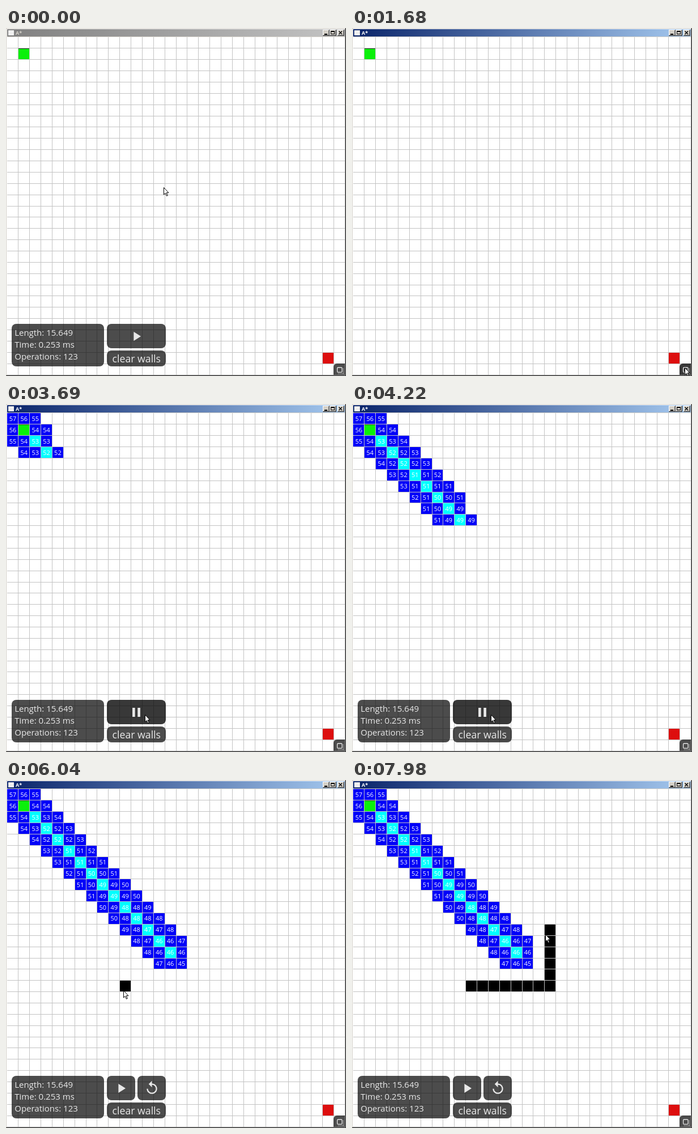
These frames come from a looping animation (600 by 614 pixels, 8000 ms). An HTML page with a canvas:

```html
<!DOCTYPE html>
<html lang="en">
<head>
<meta charset="utf-8">
<title>Path search</title>
<style>
  html, body { margin: 0; width: 100%; height: 100%; overflow: hidden; background: #fff; }
  canvas { display: block; }
</style>
</head>
<body>
<canvas id="stage" width="600" height="614"></canvas>
<script>
const ctx = document.getElementById('stage').getContext('2d');
const LOOP = 8000, PITCH = 596 / 30, LEFT = 2, TOP = 16;
const FONT = '"Open Sans", "Noto Sans", sans-serif';
const INK = '#e8e8e8';

// Screen refreshes: first time, last time, number of steps.
const REFRESH = [
  [0, 0, 1], [350, 1130, 11], [1210, 1290, 2], [1600, 1680, 2], [2530, 2530, 1],
  [2760, 3220, 7], [3450, 4220, 11], [4300, 4770, 7], [4930, 5720, 11],
  [5800, 6040, 4], [6270, 7040, 11], [7110, 7110, 1], [7270, 7980, 10]
];
const ticks = REFRESH.flatMap(([from, to, n]) =>
  Array.from({ length: n }, (_, i) => from + (n > 1 ? (to - from) * i / (n - 1) : 0)));

// Pointer track: time, x, y.
const TRACK = [
  [0, 278, 281], [300, 278, 281], [500, 318, 325], [800, 462, 478], [1000, 560, 578],
  [1130, 585, 598], [1290, 587, 599], [2700, 587, 599], [2840, 500, 596], [2990, 330, 588],
  [3070, 272, 580], [3220, 245, 548], [4850, 245, 548], [4930, 248, 516], [5010, 252, 468],
  [5300, 246, 424], [5720, 224, 380], [5960, 207, 371], [6200, 206, 371],
  [6880, 330, 370], [7040, 348, 369], [7110, 347, 369], [7200, 347, 369],
  [7500, 345, 327], [7800, 342, 281], [7900, 341, 273], [7980, 341, 272]
];

function pointer(t) {
  let i = TRACK.findIndex(p => p[0] > t);
  if (i < 0) return TRACK[TRACK.length - 1].slice(1);
  const [a, b] = [TRACK[i - 1], TRACK[i]];
  const f = (t - a[0]) / (b[0] - a[0]);
  return [1, 2].map(j => a[j] + (b[j] - a[j]) * f);
}

// Cells in the order the search visits them, expanding along the diagonal.
const AROUND = [[1, 0], [1, 1], [0, 1], [-1, 1], [-1, 0], [-1, -1], [0, -1], [1, -1]];
const visits = [];
const seen = new Set(['1,1']);
for (let k = 1; k <= 14; k++) {
  for (const [dx, dy] of AROUND) {
    const c = k + dx, r = k + dy, key = c + ',' + r;
    if (seen.has(key)) continue;
    seen.add(key);
    const cost = (k - 1) * Math.SQRT2 + Math.hypot(dx, dy);
    visits.push({ c, r, k, score: Math.floor(56 - c - r + cost) });
  }
}

const edgeX = c => Math.round(LEFT + c * PITCH);
const edgeY = r => Math.round(TOP + r * PITCH);

function rect(color, x, y, w, h) {
  ctx.fillStyle = color;
  ctx.fillRect(x, y, w, h);
}

function cell(color, c, r) {
  const x = edgeX(c), y = edgeY(r);
  rect(color, x, y, edgeX(c + 1) - x, edgeY(r + 1) - y);
}

function text(str, x, y, font, color, align = 'left') {
  ctx.font = font + ' ' + FONT;
  ctx.fillStyle = color;
  ctx.textAlign = align;
  ctx.fillText(str, x, y);
}

function panel(x, y, w, h, dark, radii = 8) {
  ctx.fillStyle = `rgba(0,0,0,${dark ? 0.78 : 0.7})`;
  ctx.beginPath();
  ctx.roundRect(x, y, w, h, radii);
  ctx.fill();
}

const ICONS = {
  play: new Path2D('M8 5v14l11-7z'),
  pause: new Path2D('M6 19h4V5H6zM14 5v14h4V5z'),
  replay: new Path2D('M12 5V1L7 6l5 5V7c3.3 0 6 2.7 6 6s-2.7 6-6 6-6-2.7-6-6H4c0 4.4 3.6 8 8 8s8-3.6 8-8-3.6-8-8-8z')
};

function icon(name, x, y) {
  ctx.save();
  ctx.translate(x, y);
  ctx.scale(1.15, 1.15);
  ctx.translate(-12, -12);
  ctx.fillStyle = INK;
  ctx.fill(ICONS[name]);
  ctx.restore();
}

function windowFrame(active) {
  rect('#d4d0c8', 0, 0, 600, 614);
  rect('#fff', 1, 1, 598, 612);
  rect('#404040', 599, 0, 1, 614);
  rect('#404040', 0, 613, 600, 1);
  rect('#808080', 598, 1, 1, 612);
  rect('#808080', 1, 612, 598, 1);
  const bar = ctx.createLinearGradient(2, 0, 598, 0);
  bar.addColorStop(0, active ? '#0a246a' : '#808080');
  bar.addColorStop(1, active ? '#a6caf0' : '#c4c4c4');
  rect(bar, 2, 2, 596, 13);
  rect('#d4d0c8', 2, 15, 596, 1);
  rect('#f0f0f0', 4, 4, 10, 9);
  text('A*', 17, 12, 'bold 9px', active ? '#fff' : '#d4d0c8');
  for (const x of [559, 571, 585]) {
    rect('#404040', x, 3, 12, 11);
    rect('#fff', x, 3, 11, 10);
    rect('#808080', x + 1, 4, 10, 9);
    rect('#d4d0c8', x + 1, 4, 9, 8);
  }
  rect('#000', 562, 10, 5, 2);
  ctx.strokeStyle = '#000';
  ctx.lineWidth = 1;
  ctx.strokeRect(573.5, 5.5, 6, 5);
  rect('#000', 573, 5, 7, 2);
  ctx.lineWidth = 1.4;
  ctx.beginPath();
  ctx.moveTo(587.5, 5.5); ctx.lineTo(593, 11);
  ctx.moveTo(593, 5.5); ctx.lineTo(587.5, 11);
  ctx.stroke();
}

function walls(t) {
  if (t < 6000) return;
  const [x, y] = pointer(t - 65);
  const last = Math.min(17, Math.max(10, Math.floor((x - LEFT) / PITCH)));
  const end = t > 7000 ? 17 : last;
  for (let c = 10; c <= end; c++) cell('#000', c, 17);
  if (t < 7200) return;
  for (let r = Math.floor((y - TOP) / PITCH); r < 17; r++) cell('#000', 17, r);
}

function board(t) {
  rect('#fff', LEFT, TOP, 596, 596);
  const count = t < 3450 ? 0 : Math.round(44 + (t - 4220) / 18);
  const shown = visits.slice(0, count);
  const deepest = shown.length ? shown[shown.length - 1].k : 0;
  for (const { c, r } of shown) {
    cell(c === r && c > 1 && c <= deepest ? '#0ff' : '#0000f8', c, r);
  }
  walls(t);
  for (let i = 1; i < 30; i++) {
    rect('#c3c3c3', Math.floor(LEFT + i * PITCH + 0.001), TOP, 1, 596);
    rect('#c3c3c3', LEFT, Math.floor(TOP + i * PITCH + 0.001), 596, 1);
  }
  rect('#0af00a', 22, 37, 19, 18);
  rect('#204020', 22, 36, 19, 1);
  rect('#dd0e0e', 559, 573, 19, 19);
  for (const { c, r, score } of shown) {
    text(score, LEFT + (c + 0.5) * PITCH, TOP + (r + 0.5) * PITCH + 4, '11px', '#fff', 'center');
  }
}

function cornerButton(hover, dotted) {
  panel(578, 592, 20, 20, hover, [6, 0, 0, 0]);
  ctx.strokeStyle = INK;
  ctx.lineWidth = 1.3;
  ctx.setLineDash(dotted ? [1.3, 1.3] : []);
  ctx.beginPath();
  ctx.roundRect(584.6, 599, 8.4, 8.4, 1.5);
  ctx.stroke();
  ctx.setLineDash([]);
  for (let i = 0; i < 5; i++) {
    rect(INK, 594.8, 600.5 + i * 2.2, 1.1, 1.1);
    rect(INK, 586 + i * 2.2, 609.3, 1.1, 1.1);
  }
}

function controls(t) {
  const hidden = t >= 1670 && t < 2530;
  const onCorner = t > 1100 && t < 2760;
  cornerButton(onCorner, onCorner && !hidden);
  if (hidden) return;

  panel(10, 522, 163, 75);
  ['Length: 15.649', 'Time: 0.253 ms', 'Operations: 123'].forEach((line, i) =>
    text(line, 15.2, 543.3 + i * 21, '15px', INK));

  if (t < 4765) {
    const running = t >= 3450;
    panel(178, 522, 104, 43, running);
    icon(running ? 'pause' : 'play', 230, 544);
  } else {
    panel(178, 522, 50, 43);
    panel(232, 522, 50, 43, t < 4930);
    icon('play', 203, 544);
    icon('replay', 257.5, 543.5);
  }
  panel(178, 569, 104, 28, t > 3050 && t < 3200);
  text('clear walls', 230.3, 589.5, '17.7px', INK, 'center');
}

const ARROW = new Path2D('M.5 .5V13L3.3 10.4 5.4 15.3 7.3 14.5 5.2 9.7H9z');

function drawPointer(t) {
  const [x, y] = pointer(t).map(Math.round);
  ctx.save();
  ctx.translate(x, y);
  ctx.fillStyle = '#fff';
  ctx.fill(ARROW);
  ctx.strokeStyle = '#000';
  ctx.lineWidth = 1;
  ctx.stroke(ARROW);
  ctx.restore();
}

function draw(t) {
  windowFrame(t >= 1600);
  board(t);
  controls(t);
  drawPointer(t);
}

const start = performance.now();
function frame() {
  const t = Math.max(0, performance.now() - start) % LOOP;
  draw(ticks.filter(tick => tick <= t).pop());
  requestAnimationFrame(frame);
}
frame();
</script>
</body>
</html>
```
